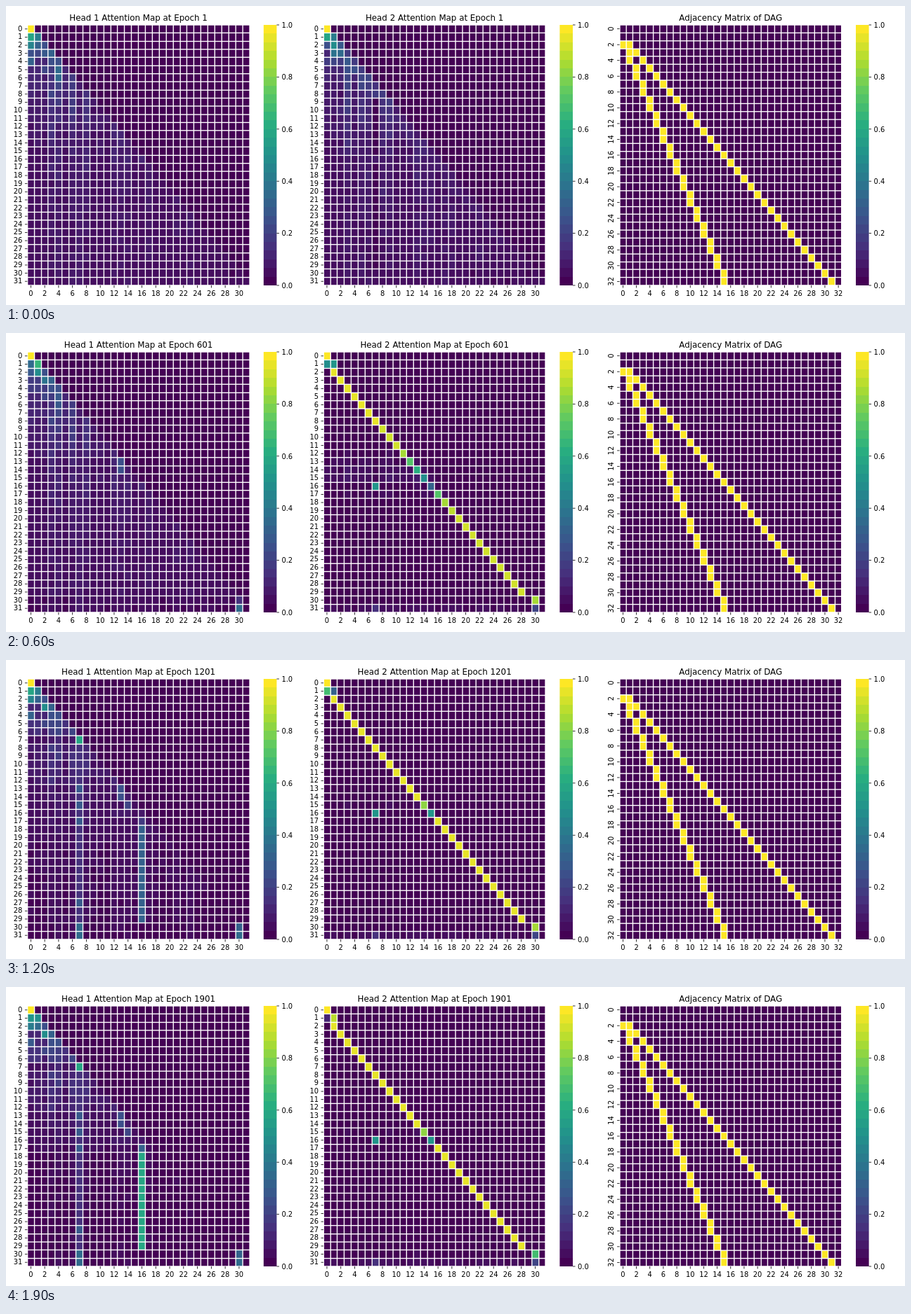
An HTML page with a canvas that plays this animation: 1280x427 px, repeating every 2 s.

```html
<!DOCTYPE html>
<html lang="en">
<head>
<meta charset="utf-8">
<title>Attention maps</title>
<style>
html, body { margin: 0; width: 100%; height: 100%; overflow: hidden; background: #fff; }
canvas { display: block; }
</style>
</head>
<body>
<canvas id="stage" width="1280" height="427"></canvas>
<script>
const ctx = document.getElementById('stage').getContext('2d');
const TOP = 27, HEIGHT = 372, WIDTH = 316.3, GAP = 1.4, N = 32, BANDS = 30;
const FONT = 9.88, TITLE_FONT = 11.85;
const LEFTS = [30.4, 452, 873.6];
const VIRIDIS = [[68, 1, 84], [71, 45, 123], [59, 82, 139], [44, 114, 142], [33, 145, 140],
  [40, 174, 128], [94, 201, 98], [173, 220, 48], [253, 231, 37]];

const range = (from, to) => Array.from({ length: to - from + 1 }, (_, n) => from + n);
const ramp = (t, from, to) => Math.max(0, Math.min(1, (t - from) / (to - from)));
const mix = (a, b, p) => a + (b - a) * p;
const wave = (t, peak, period) => Math.cos(2 * Math.PI * (t - peak) / period);
const bump = (t, peak, width) => Math.exp(-(((t - peak) / width) ** 2));
// Grid lines sit on the whole pixels of an 1800 px wide figure.
const snap = v => Math.round(v * 1800 / 1280) * 1280 / 1800;

const palette = range(0, BANDS - 1).map(band => {
  const p = band / (BANDS - 1) * 8, n = Math.min(7, Math.floor(p));
  return `rgb(${VIRIDIS[n].map((c, k) => Math.round(mix(c, VIRIDIS[n + 1][k], p - n)))})`;
});
const color = v => palette[Math.round(Math.max(0, Math.min(1, v)) * (BANDS - 1))];

function seeded(seed) {
  return () => (seed = (seed * 16807) % 2147483647) / 2147483647;
}

// Focus rules set single cells; the rest of each row's sum is shared by random weights.
function makeHead(seed, strongColumns) {
  const random = seeded(seed);
  const weights = range(0, N - 1).map(row => range(0, row).map(col =>
    (strongColumns.includes(col) ? 1.5 : 0.75) * Math.exp((random() - 0.5) * 0.6)));
  const rules = weights.map(() => ({}));
  const focus = (rows, col, rule) => {
    for (const row of [].concat(rows)) rules[row][col] = rule;
  };
  return { weights, rules, focus };
}

function rowValues(head, row, t) {
  const fixed = {};
  let rest = 1, total = 0;
  for (const col in head.rules[row]) rest -= fixed[col] = head.rules[row][col](t);
  head.weights[row].forEach((w, col) => { if (!(col in fixed)) total += w; });
  return range(0, N - 1).map(col => col > row ? 0
    : fixed[col] ?? Math.max(0, rest) * head.weights[row][col] / total);
}

// Head 1: columns 7 and 16 slowly attract the later rows.
const first = makeHead(71, [3, 4, 6, 7, 8, 12, 13, 14, 16, 17, 21, 23]);
const firstPulse = t => 0.5 + 0.16 * wave(t, 15, 18);
const column7 = peak => t => mix(0.06, peak, ramp(t, 6, 12));
first.focus(1, 0, firstPulse);
first.focus(2, 0, t => firstPulse(t) * 0.8);
first.focus(2, 2, () => 0.23);
first.focus(3, 2, t => mix(0.26, 0.48, ramp(t, 0, 12)));
first.focus(3, 3, () => 0.3);
first.focus(4, 0, t => firstPulse(t) * 0.55);
first.focus(4, 3, () => 0.25);
first.focus(4, 4, () => 0.24);
first.focus(5, 2, () => 0.21);
first.focus([5, 6], 4, t => mix(0.33, 0.17, ramp(t, 0, 18)));
first.focus(range(8, 29), 7, column7(0.15));
first.focus([13, 15, 17, 27], 7, column7(0.29));
first.focus([30, 31], 7, column7(0.34));
first.focus(7, 7, column7(0.6));
first.focus([13, 14], 13, t => mix(0.1, 0.24, ramp(t, 0, 6)));
first.focus(15, 14, t => mix(0.06, 0.22, ramp(t, 6, 10)));
first.focus(range(17, 29), 16, t => mix(0.05, 0.59, ramp(t, 6, 19)));
first.focus(17, 16, t => mix(0.05, 0.3, ramp(t, 6, 19)));
first.focus(30, 29, t => 0.25 * bump(t, 3, 1.5));
first.focus(30, 30, t => mix(0.04, 0.32, ramp(t, 2, 12)));
first.focus(31, 30, t => mix(0.04, 0.33, ramp(t, 0, 5)));

// Head 2: each row locks on to its predecessor, the top rows first.
const second = makeHead(333, [3, 5, 6, 7, 8, 9, 13, 14, 15, 17, 18, 22]);
second.focus(range(11, 29), 7, t => 0.09 * bump(t, 3, 1.5));
second.focus([9, 10, 14], 7, t => 0.4 * bump(t, 3, 1.5));
for (const row of range(2, 29)) {
  const start = row < 9 ? 0 : 3;
  const end = row < 9 ? 3.5 : 6.2 + 2.5 * bump(row, 15, 2);
  const limit = row === 16 ? 0.5 : row === 15 ? 0.84 : 0.98;
  second.focus(row, row - 1, t => mix(1.4 / (row + 1), limit, ramp(t, start, end)));
}
second.focus(1, 0, t => 0.62 + 0.14 * wave(t, 16, 22) - 0.6 * ramp(t, 18, 19));
second.focus(3, 1, t => 0.38 * (1 - ramp(t, 0, 3)));
second.focus(16, 7, t => mix(0.06, 0.5, ramp(t, 3, 6)));
second.focus(30, 30, t => mix(0.04, 0.85, ramp(t, 2, 6)) - 0.15 * ramp(t, 14, 19));
second.focus(31, 7, t => mix(0.03, 0.13, ramp(t, 3, 6)));
second.focus(31, 30, t => mix(0.04, 0.22, ramp(t, 3, 6)));

const adjacency = range(0, N).map(row => range(0, N).map(col =>
  row > 1 && (col === row - 1 || col === Math.floor((row - 1) / 2)) ? 1 : 0));

function label(text, x, baseline, align, size = FONT) {
  ctx.font = `${size}px "DejaVu Sans", sans-serif`;
  ctx.textAlign = align;
  ctx.fillStyle = '#000';
  ctx.fillText(text, x, baseline);
}

function tick(x, y, w, h) {
  ctx.fillStyle = '#000';
  ctx.fillRect(x, y, w, h);
}

function drawColorbar(x) {
  const h = HEIGHT / BANDS;
  palette.forEach((fill, n) => {
    const top = Math.round(TOP + HEIGHT - (n + 1) * h);
    ctx.fillStyle = fill;
    ctx.fillRect(x, top, 18.6, Math.round(TOP + HEIGHT - n * h) - top);
  });
  for (let n = 0; n <= 5; n++) {
    const y = TOP + HEIGHT * (1 - n / 5);
    tick(x + 18.6, y - 0.4, 3.5, 0.8);
    label((n / 5).toFixed(1), x + 25.6, y + 3.7, 'left');
  }
}

function drawMap(left, title, rows, rotated) {
  const lines = (from, size) => range(0, rows.length).map(n => snap(from + n * size / rows.length));
  const xs = lines(left, WIDTH), ys = lines(TOP, HEIGHT);
  rows.forEach((values, row) => values.forEach((v, col) => {
    ctx.fillStyle = color(v);
    ctx.fillRect(xs[col] + GAP / 2, ys[row] + GAP / 2,
      xs[col + 1] - xs[col] - GAP, ys[row + 1] - ys[row] - GAP);
  }));
  for (let n = 0; n < rows.length; n++) {
    const x = left + (n + 0.5) * WIDTH / rows.length;
    const y = TOP + (n + 0.5) * HEIGHT / rows.length;
    if (n % 2 === 0) {
      tick(x - 0.4, TOP + HEIGHT, 0.8, 3.5);
      label(n, x, 414, 'center');
    }
    if (rotated && n % 2) continue;
    tick(left - 3.5, y - 0.4, 3.5, 0.8);
    if (rotated) {
      ctx.save();
      ctx.translate(left - 9, y);
      ctx.rotate(-Math.PI / 2);
      label(n, 0, 0, 'center');
      ctx.restore();
    } else {
      label(n, left - 7, y + 3, 'right');
    }
  }
  label(title, left + WIDTH / 2, 20.8, 'center', TITLE_FONT);
  drawColorbar(left + 336.4);
}

function draw(step) {
  ctx.fillStyle = '#fff';
  ctx.fillRect(0, 0, 1280, 427);
  [first, second].forEach((head, n) => drawMap(LEFTS[n],
    `Head ${n + 1} Attention Map at Epoch ${step * 100 + 1}`,
    range(0, N - 1).map(row => rowValues(head, row, step))));
  drawMap(LEFTS[2], 'Adjacency Matrix of DAG', adjacency, true);
}

let shown = -1;
function animate() {
  const step = Math.floor(performance.now() % 2000 / 100);
  if (step !== shown) draw(shown = step);
  requestAnimationFrame(animate);
}
animate();
</script>
</body>
</html>
```
